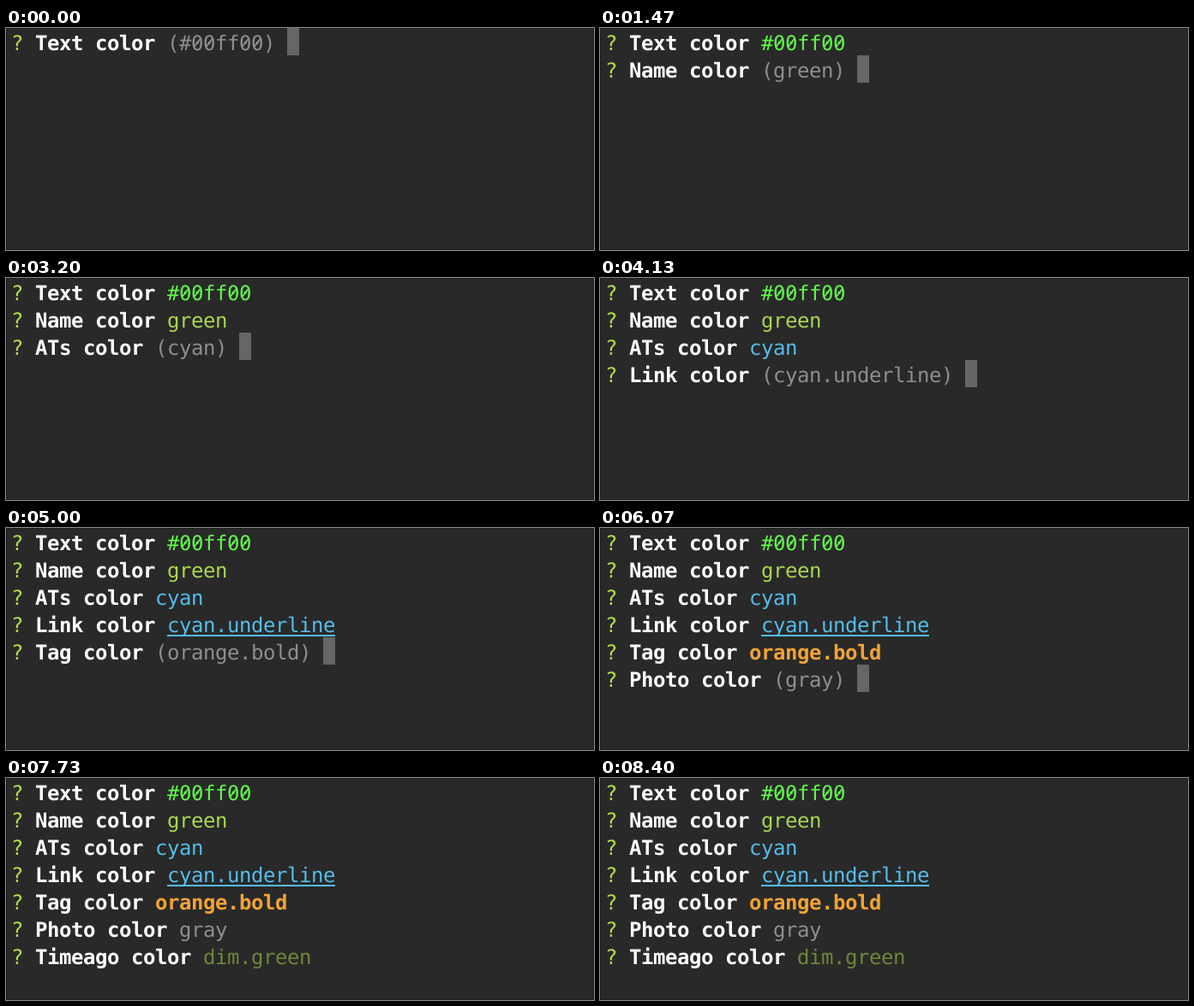
Write an HTML page that moves like this. It is 686 px wide and 260 px high and loops after 8.47 s.

```html
<!DOCTYPE html>
<html lang="en">
<head>
<meta charset="utf-8">
<title>Color prompts</title>
<style>
  html, body { margin: 0; width: 100%; height: 100%; overflow: hidden; background: #292929; }
  svg { display: block; width: 686px; height: 260px; }
  text {
    font: 24px "DejaVu Sans Mono", "Liberation Mono", monospace;
    letter-spacing: -0.449px;
    text-rendering: geometricPrecision;
  }
  .bold { font-weight: bold; }
</style>
</head>
<body>
<svg id="term" viewBox="0 0 686 260">
  <rect width="686" height="260" fill="#292929"/>
  <rect x="0.5" y="0.5" width="685" height="259" fill="none" stroke="#1f1f1f"/>
</svg>
<script>
const LOOP = 8470, CELL = 14, ROW = 32, LEFT = 6, BASE = 26;
const GRAY = '#8e8e8e', CYAN = '#54bdeb', MARK = '#b2dc4b';

// at: when the answer is accepted; pause: how long the cursor waits on the next row
const prompts = [
  { label: 'Text color',    value: '#00ff00',        color: '#62f64c', at: 1470 },
  { label: 'Name color',    value: 'green',          color: '#aad650', at: 2330 },
  { label: 'ATs color',     value: 'cyan',           color: CYAN,      at: 3270, pause: 65 },
  { label: 'Link color',    value: 'cyan.underline', color: CYAN,      at: 4300, line: true },
  { label: 'Tag color',     value: 'orange.bold',    color: '#f2a336', at: 5270, bold: true },
  { label: 'Photo color',   value: 'gray',           color: GRAY,      at: 6270 },
  { label: 'Timeago color', value: 'dim.green',      color: '#6f863a', at: 7270, pause: 65 }
];

const term = document.getElementById('term');
const colX = col => LEFT + col * CELL;

function add(parent, tag, attrs, content = '') {
  const el = document.createElementNS('http://www.w3.org/2000/svg', tag);
  for (const key in attrs) el.setAttribute(key, attrs[key]);
  el.textContent = content;
  return parent.appendChild(el);
}

function write(parent, col, row, content, fill, bold) {
  const y = row * ROW + BASE;
  const g = add(parent, 'g', {});
  add(g, 'text', { x: colX(col), y, fill, class: bold ? 'bold' : '' }, content);
  // slashed zeros
  [...content].forEach((ch, i) => {
    if (ch !== '0') return;
    const x = colX(col + i);
    add(g, 'path', { d: `M${x + 4} ${y - 4.5}L${x + 10.4} ${y - 13}`, stroke: fill, 'stroke-width': 1.7 });
  });
  return g;
}

const cursor = add(term, 'rect', { width: CELL, height: ROW, fill: '#666666' });

prompts.forEach((p, row) => {
  const prev = prompts[row - 1];
  p.start = prev ? prev.at + (prev.pause || 0) : 0;
  const col = p.label.length + 3;
  p.end = col + p.value.length + 3;
  p.group = add(term, 'g', {});
  write(p.group, 0, row, '?', MARK);
  write(p.group, 2, row, p.label, '#ffffff', true);
  p.hint = write(p.group, col, row, `(${p.value})`, GRAY);
  p.answer = write(p.group, col, row, p.value, p.color, p.bold);
  if (p.line) {
    add(p.answer, 'rect', {
      x: colX(col), y: row * ROW + 29, width: p.value.length * CELL, height: 2, fill: p.color
    });
  }
});

const show = (el, on) => el.setAttribute('visibility', on ? 'visible' : 'hidden');

function draw(t) {
  let spot = null;
  prompts.forEach((p, row) => {
    const shown = t >= p.start, done = t >= p.at;
    show(p.group, shown);
    show(p.hint, shown && !done);
    show(p.answer, done);
    if (shown && !done) spot = [p.end, row];
    if (done && t < p.at + (p.pause || 0)) spot = [0, row + 1];
  });
  show(cursor, spot);
  if (spot) {
    cursor.setAttribute('x', colX(spot[0]));
    cursor.setAttribute('y', spot[1] * ROW);
  }
}

const begin = performance.now();
function tick() {
  draw((performance.now() - begin) % LOOP);
  requestAnimationFrame(tick);
}
tick();
</script>
</body>
</html>
```
